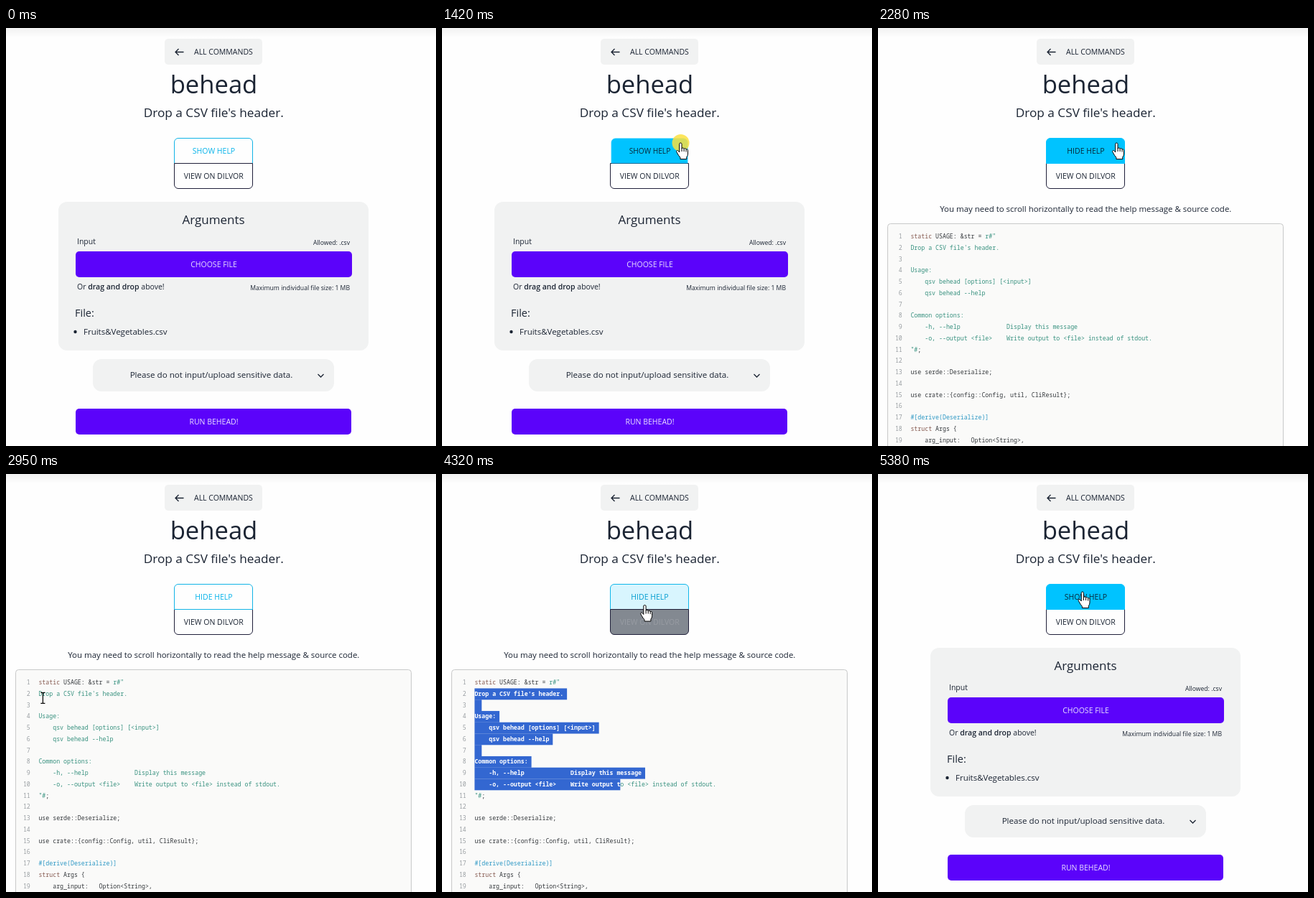
An HTML page that plays this animation: 599x582 px, repeating every 6.54 s.

```html
<!DOCTYPE html>
<html lang="en">
<head>
<meta charset="utf-8">
<title>behead</title>
<style>
html, body { margin: 0; width: 100%; height: 100%; overflow: hidden; background: #fefefe; }
svg { display: block; width: 100vw; height: 100vh; }
text { font-family: "Open Sans", "Noto Sans", sans-serif; font-size: 10.5px; fill: #1b2433; white-space: pre; }
.mid { text-anchor: middle; }
.end { text-anchor: end; font-size: 8.65px; }
.medium { font-weight: 500; }
.bold { font-weight: 600; }
.on { fill: #e9e0ff; }
.panel { fill: #f1f2f2; }
.solid { fill: #5b03fa; }
.line { fill: none; stroke: #1b2433; stroke-width: 1.3; }
.code text { font-family: "Noto Sans Mono", "DejaVu Sans Mono", monospace; font-size: 8.25px; }
.code .num { fill: #9a9fa3; text-anchor: end; }
.code .picked { fill: #fff; font-weight: 600; }
</style>
</head>
<body>
<svg viewBox="0 0 599 582">
  <defs>
    <linearGradient id="shade" x2="0" y2="1">
      <stop offset="0" stop-color="#f1f1f1"/><stop offset="1" stop-color="#fefefe"/>
    </linearGradient>
  </defs>
  <rect width="599" height="582" fill="#fefefe"/>
  <rect width="599" height="13" fill="url(#shade)"/>

  <rect class="panel" x="221" y="15" width="136" height="36" rx="5"/>
  <path class="line" d="M247.5 33.5H236M240.5 29l-4.5 4.5 4.5 4.5"/>
  <text x="262" y="37">ALL COMMANDS</text>
  <text class="mid medium" x="289.5" y="91" style="font-size:34.6px">behead</text>
  <text class="mid medium" x="289.3" y="124" style="font-size:17.2px">Drop a CSV file's header.</text>

  <g id="buttons">
    <g id="help">
      <path id="helpBox" d="M234.5 188.5V159a5.5 5.5 0 0 1 5.500 -5.500H338a5.500 5.500 0 0 1 5.500 5.500V188.500Z"/>
      <text id="helpText" class="mid" x="289.500" y="175"></text>
    </g>
    <g id="view">
      <path id="viewShape" d="M234.500 188.500H343.500V218a5.500 5.500 0 0 1 -5.500 5.500H240a5.500 5.500 0 0 1 -5.500 -5.500Z" stroke="#20203a"/>
      <text id="viewText" class="mid" x="289.300" y="210">VIEW ON DILVOR</text>
    </g>
  </g>

  <g id="form">
    <rect class="panel" x="73" y="242" width="432" height="207" rx="12"/>
    <text class="mid" x="289" y="273" style="font-size:17px">Arguments</text>
    <text x="99" y="301">Input</text>
    <text class="end" x="479" y="302">Allowed: .csv</text>
    <rect class="solid" x="97" y="311" width="385" height="36" rx="5"/>
    <text class="mid on" x="289.500" y="333">CHOOSE FILE</text>
    <text x="99" y="364">Or <tspan class="bold">drag and drop</tspan> above!</text>
    <text class="end" x="479" y="365">Maximum individual file size: 1 MB</text>
    <text x="96" y="402" style="font-size:14.5px">File:</text>
    <circle cx="96.500" cy="423" r="2.200" fill="#1b2433"/>
    <text x="108" y="427" style="font-size:11.5px">Fruits&amp;Vegetables.csv</text>
    <rect class="panel" x="121" y="461" width="336" height="45" rx="12"/>
    <text class="mid medium" x="286" y="487" style="font-size:11.6px">Please do not input/upload sensitive data.</text>
    <path class="line" d="M434.500 482l4 4 4 -4"/>
    <rect class="solid" x="97" y="530" width="384" height="36" rx="5"/>
    <text class="mid on" x="289.500" y="552">RUN BEHEAD!</text>
  </g>

  <g id="source" class="code">
    <rect x="13.500" y="272.500" width="551" height="330" rx="4" fill="#fafaf9" stroke="#c8c9c9"/>
    <g id="lines"></g>
    <g id="selection"></g>
  </g>
  <text id="note" class="mid" x="289.300" y="256" style="font-size:11.46px">You may need to scroll horizontally to read the help message &amp; source code.</text>

  <g id="cursor" stroke="#000" stroke-linejoin="round">
    <circle id="press" r="12" fill="#fbe13f" fill-opacity=".85" stroke="none"/>
    <path id="arrow" d="M0 0V15.500L3.600 12.200 6 17.800 8.500 16.700 6.100 11.300H11Z" fill="#fff"/>
    <path id="hand" d="M-1.800 1.500Q-1.800 0 -.2 0T1.500 1.500V8Q2 6.600 3.300 6.900T4.600 8.600Q5.200 7.300 6.400 7.700T7.600 9.400Q8.200 8.300 9.200 8.900T10 10.800V15Q10 17.800 8.300 19.600V22.500H-.6V20.300Q-3 17.700 -4.300 15L-5.800 12.400Q-6.200 11 -5.100 10.600T-3 11.500L-1.800 13ZM1.500 8V12M4.600 8.600V12M7.600 9.400V12.500" fill="#fff"/>
    <path id="beam" d="M-3 -7.500H-1Q0 -7.500 0 -6.500 0 -7.500 1 -7.500H3M0 -6.500V6.500M-3 7.500H-1Q0 7.500 0 6.500 0 7.500 1 7.500H3" fill="none" stroke-width="1.200"/>
  </g>
</svg>
<script>
const LOOP = 6540, FRAME = 60, FADE = 200;
const OPEN = 1420, DRAG = 3370, DROP = 3660, CLOSE = 5140;
const X0 = 45.4, CHAR = 4.95, TOP = 282.7, ROW = 15.75;
const $ = id => document.getElementById(id);
const clamp = u => Math.min(1, Math.max(0, u));

// Each move slows down towards its end; `via` bends the path.
const entry = { x: 600, y: 134 };
const moves = [
  { start: 590, end: 870, x: 332.5, y: 160 },
  { start: 2230, end: 2830, x: 57, y: 318, via: { x: 330, y: 275 } },
  { start: 2890, end: 3090, x: 46, y: 306 },
  { start: DRAG, end: 3610, x: 250, y: 435 },
  { start: 3840, end: 4490, x: 285, y: 164 }
];
const beats = [0, OPEN, CLOSE, ...moves.map(m => m.start)].sort((a, b) => a - b);

function pointer(t) {
  const i = moves.filter(m => m.start <= t).length - 1;
  if (i < 0) return entry;
  const to = moves[i], from = moves[i - 1] || entry;
  const u = 1 - (1 - clamp((t - to.start) / (to.end - to.start))) ** 2;
  const axis = k => {
    const mid = to.via ? to.via[k] : (from[k] + to[k]) / 2;
    return (1 - u) ** 2 * from[k] + 2 * u * (1 - u) * mid + u * u * to[k];
  };
  return { x: axis("x"), y: axis("y") };
}

// The picture holds for one frame at a time, counted from the latest beat.
function hold(time) {
  const beat = beats.filter(b => b <= time).pop();
  return beat + Math.floor((time - beat) / FRAME) * FRAME;
}

const within = (v, a, b) => v >= a && v < b;
const inHelp = p => within(p.x, 234, 344) && within(p.y, 153, 188);
const inView = p => within(p.x, 234, 344) && within(p.y, 188, 224);

// Linear hover fade: the share of the last moments spent inside.
function hover(inside, t) {
  const n = 20;
  let hits = 0;
  for (let i = 0; i < n; i++) hits += inside(pointer(t - i * FADE / n));
  return hits / n;
}

function mix(a, b, u) {
  const part = (c, i) => parseInt(c.slice(1 + 2 * i, 3 + 2 * i), 16);
  return `rgb(${[0, 1, 2].map(i => Math.round(part(a, i) + (part(b, i) - part(a, i)) * u))})`;
}

const show = (id, on) => $(id).setAttribute("display", on ? "inline" : "none");

function add(parent, name, attrs, content = "") {
  const el = document.createElementNS("http://www.w3.org/2000/svg", name);
  for (const k in attrs) el.setAttribute(k, attrs[k]);
  el.textContent = content;
  parent.append(el);
  return el;
}

const ink = "#34383c", word = "#85594f", str = "#37917f", attr = "#2b97c4";
const help = [
  "Drop a CSV file's header.", "", "Usage:",
  "    qsv behead [options] [<input>]", "    qsv behead --help", "",
  "Common options:", "    -h, --help             Display this message",
  "    -o, --output <file>    Write output to <file> instead of stdout."
];
const code = [
  [["static", word], [" USAGE: &str = ", ink], ['r#"', str]],
  ...help.map(s => [[s, str]]),
  [['"#', str], [";", ink]],
  [],
  [["use serde::Deserialize;", ink]],
  [],
  [["use crate::{config::Config, util, CliResult};", ink]],
  [],
  [["#[derive(Deserialize)]", attr]],
  [["struct", word], [" Args {", ink]],
  [["    arg_input:   Option<String>,", ink]]
];
const baseline = row => 293 + ROW * row;

code.forEach((parts, row) => {
  add($("lines"), "text", { class: "num", x: 33.8, y: baseline(row) }, row + 1);
  const line = add($("lines"), "text", { x: X0, y: baseline(row) });
  for (const [s, color] of parts) add(line, "tspan", { style: "fill:" + color }, s);
});

const marks = help.map((s, i) => ({
  box: add($("selection"), "rect", { x: X0, y: TOP + ROW * (i + 1), height: ROW + 0.1, fill: "#3367d1" }),
  label: add($("selection"), "text", { class: "picked", x: X0, y: baseline(i + 1) })
}));

// The selection trails the dragged pointer by one frame.
function drawSelection(t) {
  const p = pointer(Math.min(DROP, Math.max(DRAG, t - FRAME)));
  const last = Math.floor((p.y - TOP) / ROW) - 1;
  const col = Math.floor((p.x - X0) / CHAR);
  marks.forEach(({ box, label }, i) => {
    const full = Math.max(help[i].length + 1, 2);
    const n = i < last ? full : i === last ? Math.min(col, full) : 0;
    box.setAttribute("width", n * CHAR);
    label.textContent = help[i].slice(0, n);
  });
}

function drawButtons(t, open) {
  const h = hover(inHelp, t), v = hover(inView, t);
  const since = t - (t < CLOSE ? OPEN : CLOSE);
  const scale = since < 0 ? 1 : 1 - 0.03 * clamp((220 - since) / 110);
  const focused = within(t, OPEN, DRAG) || t >= CLOSE;
  $("buttons").append(focused ? $("help") : $("view"));
  $("helpBox").setAttribute("fill", mix("#fefefe", "#00c3ff", h));
  $("helpBox").setAttribute("stroke", mix("#12b4e6", "#00c3ff", h));
  $("helpText").style.fill = mix("#06b3ea", "#08283a", h);
  $("helpText").textContent = open ? "HIDE HELP" : "SHOW HELP";
  $("help").setAttribute("transform", `translate(289.5 171) scale(${scale}) translate(-289.5 -171)`);
  $("viewShape").setAttribute("fill", mix("#fefefe", "#1f2937", v));
  $("viewText").style.fill = mix("#1b2433", "#ffffff", v);
}

function drawCursor(t, open) {
  const p = pointer(t);
  const kind = inHelp(p) || inView(p) ? "hand" : open && p.y > TOP ? "beam" : "arrow";
  const clicked = [OPEN, CLOSE].some(c => within(t, c, c + FRAME));
  for (const id of ["hand", "beam", "arrow"]) show(id, id === kind);
  show("press", clicked || within(t, DRAG, DROP));
  show("cursor", t >= moves[0].start);
  $("cursor").setAttribute("transform", `translate(${p.x} ${p.y})`);
}

function render(time) {
  const t = hold(time);
  const open = within(t, OPEN + FRAME, CLOSE + FRAME);
  show("form", !open);
  show("source", open);
  show("note", open);
  drawButtons(t, open);
  drawSelection(t);
  drawCursor(t, open);
}

const began = performance.now();
function tick() {
  render((performance.now() - began) % LOOP);
  requestAnimationFrame(tick);
}
tick();
</script>
</body>
</html>
```
